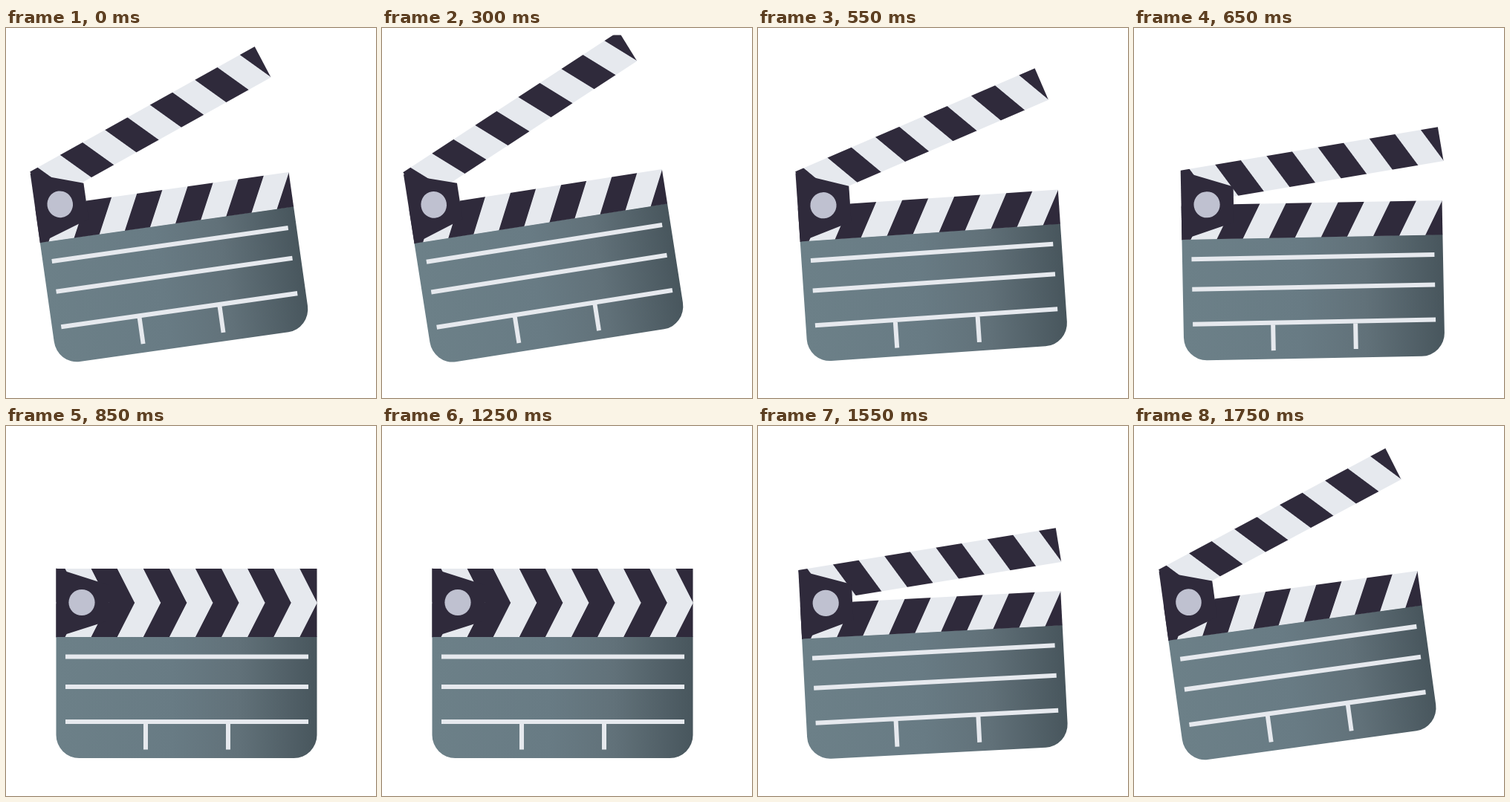
Write an HTML page that moves like this. It is 498 px wide and 498 px high and loops after 1.8 s.

```html
<!DOCTYPE html>
<html lang="en">
<head>
<meta charset="utf-8">
<title>Clapperboard</title>
<style>
  html, body { margin: 0; width: 100%; height: 100%; overflow: hidden; background: #fff; }
  svg { display: block; width: 100vw; height: 100vh; }
</style>
</head>
<body>
<svg viewBox="0 0 498 498">
  <defs>
    <linearGradient id="slate">
      <stop offset="0" stop-color="#6c8088"/>
      <stop offset=".45" stop-color="#687b84"/>
      <stop offset=".7" stop-color="#617179"/>
      <stop offset="1" stop-color="#48565d"/>
    </linearGradient>
    <linearGradient id="stripes" gradientUnits="userSpaceOnUse" spreadMethod="repeat"
        x1="79" y1="192" x2="134.7" y2="163.6">
      <stop offset="0" stop-color="#2f2a3b"/>
      <stop offset=".015" stop-color="#e6e9ee"/>
      <stop offset=".5" stop-color="#e6e9ee"/>
      <stop offset=".515" stop-color="#2f2a3b"/>
    </linearGradient>
    <clipPath id="frame"><rect y="9.5" width="498" height="488.5"/></clipPath>
    <path id="stick" fill="url(#stripes)" d="M67.5 192h351v46.3h-351z"/>
  </defs>
  <g clip-path="url(#frame)">
    <g id="board">
      <path fill="url(#slate)" d="M67.5 283.5h351V416a31 31 0 0 1-31 31h-289a31 31 0 0 1-31-31z"/>
      <path fill="none" stroke="#e6e9ee" stroke-width="6" d="M80 310.5H407M80 351H407M80 398H407M188 398V435.5M299 398V435.5"/>
      <use id="arm" href="#stick"/>
      <use href="#stick" transform="translate(0 476) scale(1 -1)"/>
      <path fill="#2f2a3b" d="M67.5 191.5L138 214V262L67.5 284.5z"/>
      <circle cx="102" cy="237.5" r="17.6" fill="#bfc1d0"/>
    </g>
  </g>
</svg>
<script>
const LOOP = 1800, SHUT = 850;
const board = document.getElementById('board');
const arm = document.getElementById('arm');

const part = (t, from, to) => Math.min(1, Math.max(0, (t - from) / (to - from)));
const ease = (t, from, to) => {
  const u = part(t, from, to);
  return u * u * (3 - 2 * u);
};

function draw(now) {
  // Time since the board was last fully shut
  const t = (now - start + LOOP - SHUT) % LOOP;

  // Both parts swing open fast, drift on slowly, then drop; the arm lags behind
  const drift = 1 - (1 - part(t, 550, 1250)) ** 1.4;
  const tilt = (6.13 * ease(t, 603, 845) + 2.77 * drift) * (1 - ease(t, 1275, 1692));
  const gape = (13.2 * ease(t, 623, 861) + 10.3 * drift) * (1 - ease(t, 1420, 1725));

  // Squash after the clap, stretch while open
  const squash = Math.sin(Math.PI * part(t, 0, 350)) ** 2;
  const stretch = ease(t, 700, 900) * (1 - ease(t, 1250, 1500));
  const s = 1 + .018 * (squash - stretch);

  board.setAttribute('transform',
    `translate(113 444.5) rotate(${-tilt}) scale(${s} ${1 / s}) translate(-113 -444.5)`);
  arm.setAttribute('transform', `rotate(${-gape} 60 191)`);
  requestAnimationFrame(() => draw(performance.now()));
}

const start = performance.now();
draw(start);
</script>
</body>
</html>
```
